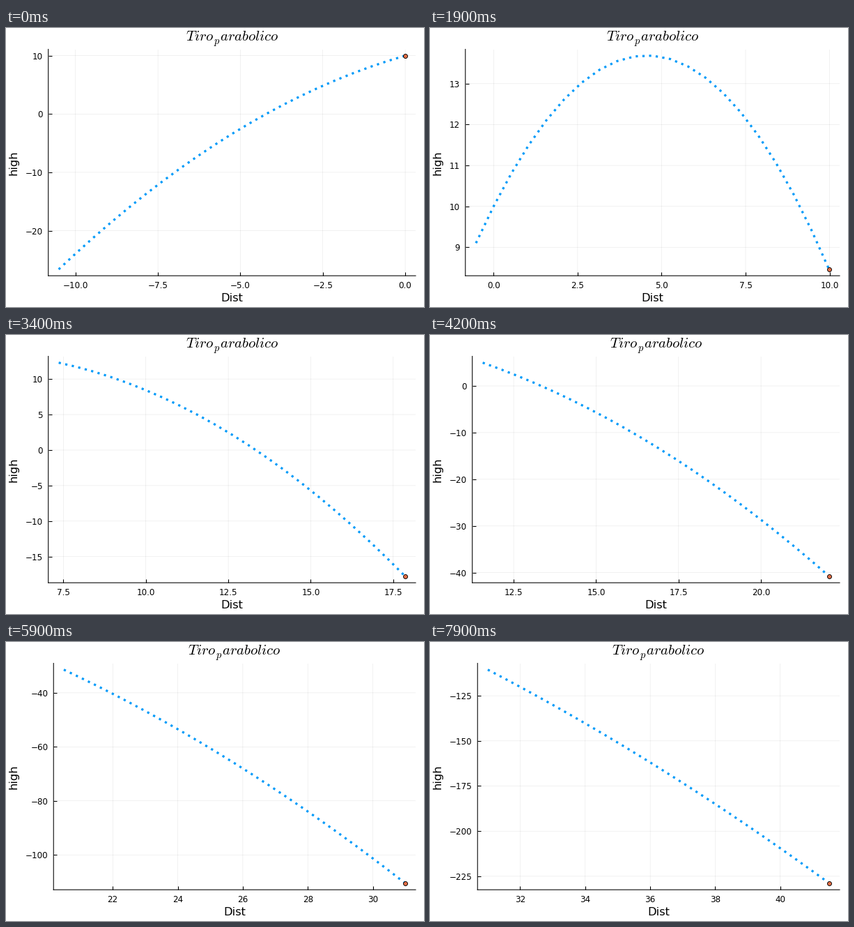
Animation of 600 by 400 pixels, one loop 8 s. Source, as a matplotlib script:

```python
import math
import numpy as np
import matplotlib.pyplot as plt
from matplotlib.animation import FuncAnimation

W, H, DPI = 600, 400, 100
PX = 72 / DPI
SCALE = 16 / 15  # common factor for fonts and line widths
RIGHT, TOP, BOTTOM = 588, 30.5, 355.2
LABEL_X, LABEL_GAP = 28, 7.7
FRAMES, STEP = 80, 0.1
ANGLE = math.radians(58.3)
VX, VY, G, Y0 = 10 * math.cos(ANGLE), 10 * math.sin(ANGLE), 9.81, 10
NICE = [(1, 1.0), (5, 0.9), (2, 0.7), (2.5, 0.5), (3, 0.2)]

plt.rcParams.update({
    "font.family": "DejaVu Sans",
    "mathtext.fontset": "cm",
    "path.snap": False,
})


def best_ticks(lo, hi, k_min=4, k_max=8, ideal=5):
    """Score candidate steps by count, zero, coverage and roundness."""
    span = hi - lo
    best, ticks, step = -math.inf, [], 1
    z = math.ceil(math.log10(span))
    while 2 * k_max * 10.0 ** (z + 1) > span:
        for k in range(k_min, 2 * k_max + 1):
            for q, nice in NICE:
                d = q * 10.0 ** z
                full = (k - 1) * d
                if not span <= full < 2 * span:
                    continue
                first, last = math.ceil(lo / d), math.floor(hi / d)
                n = last - first + 1
                if not k_min <= n <= k_max:
                    continue
                for r in range(math.ceil((hi - full) / d), math.floor(lo / d) + 1):
                    zero = r <= 0 and abs(r) < k
                    score = ((1 - abs(n - ideal) / ideal) / 4 + zero / 6
                             + 0.5 * span / ((n - 1) * d) + nice / 4)
                    if score > best + 1e-9:
                        best, step = score, d
                        ticks = [i * d for i in range(first, last + 1)]
        z -= 1
    digits = 0
    while abs(step * 10 ** digits - round(step * 10 ** digits)) > 1e-6:
        digits += 1
    labels = [f"{v + 0.0:.{digits}f}".replace("-", "\u2212") for v in ticks]
    return ticks, labels


def padded(v):
    pad = 0.03 * (v.max() - v.min())
    return v.min() - pad, v.max() + pad


def text_width(s):
    em = 8 * SCALE / PX
    return em * sum({"\u2212": 0.838, ".": 0.318}.get(c, 0.636) for c in s)


fig = plt.figure(figsize=(W / DPI, H / DPI), dpi=DPI, facecolor="white")
ax = fig.add_axes([0.1, 0.1, 0.8, 0.8])
ax.spines[["top", "right"]].set_visible(False)
ax.spines[["left", "bottom"]].set_linewidth(SCALE * PX)
ax.set_axisbelow(True)
ax.grid(color="black", alpha=0.1, lw=0.5 * SCALE * PX)
ax.tick_params(direction="in", length=5 * PX, width=SCALE * PX,
               labelsize=8 * SCALE)
ax.tick_params(axis="x", pad=7.5 * PX)
ax.tick_params(axis="y", pad=LABEL_GAP * PX)

trail, = ax.plot([], [], color="#009AF9", lw=3 * SCALE * PX, ls=(0, (1, 2)),
                 dash_capstyle="butt", clip_on=False)
ball, = ax.plot([], [], "o", ms=6 * PX, mfc="#E36F47", mec="black",
                mew=0.9 * PX, clip_on=False, zorder=5)
title = fig.text(0.5, 1 - 19 / H,
                 r"$Tiro_{\hspace{0.12}p}^{\,}\hspace{0.03}arabolico$",
                 fontsize=14 * SCALE, ha="center", va="baseline")
xlabel = fig.text(0.5, 1 - 392 / H, "Dist", fontsize=11 * SCALE,
                  ha="center", va="baseline")
fig.text(10.7 / W, 1 - 192.7 / H, "high", fontsize=11 * SCALE, rotation=90,
         ha="center", va="center")


def draw(i):
    t = (i + np.arange(-20, 1)) * STEP
    x, y = VX * t, Y0 + VY * t - G * t * t / 2
    xlim, ylim = padded(x), padded(y)
    xticks, xnames = best_ticks(*xlim)
    yticks, ynames = best_ticks(*ylim)

    left = LABEL_X + max(map(text_width, ynames)) + LABEL_GAP
    ax.set_position([left / W, 1 - BOTTOM / H, (RIGHT - left) / W, (BOTTOM - TOP) / H])
    ax.set_xticks(xticks, xnames)
    ax.set_yticks(yticks, ynames)
    ax.set_xlim(xlim)
    ax.set_ylim(ylim)
    trail.set_data(x, y)
    ball.set_data(x[-1:], y[-1:])
    for label in (title, xlabel):
        label.set_x((left + RIGHT) / 2 / W)
    return trail, ball, title, xlabel


anim = FuncAnimation(fig, draw, frames=FRAMES, interval=100, repeat=True,
                     repeat_delay=0, blit=False)
plt.show()
```
